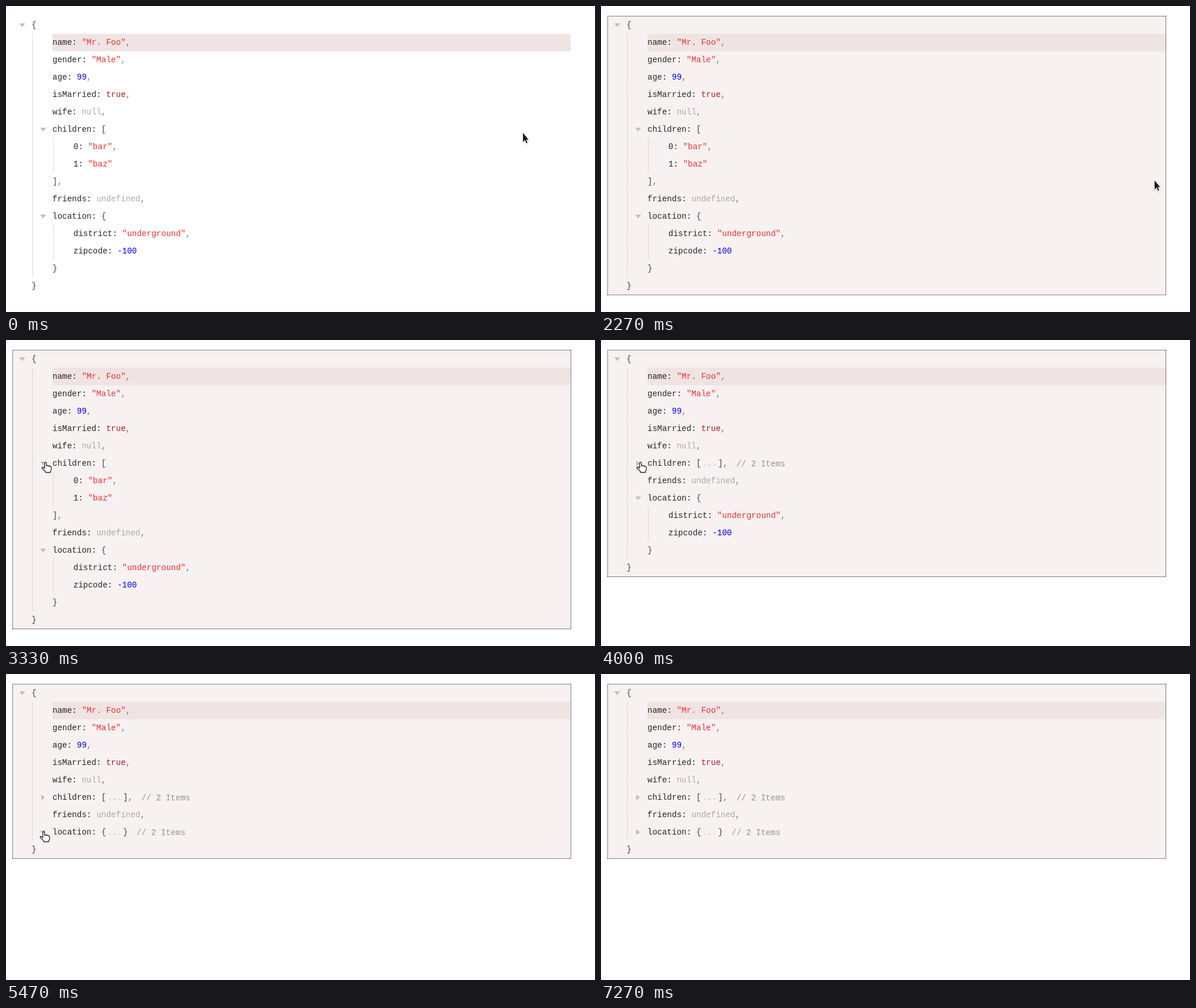
Recreate the animation shown at these times as an HTML page. Size 1014 by 528 pixels, loop 8000 ms.

```html
<!DOCTYPE html>
<html lang="en">
<head>
<meta charset="utf-8">
<title>JSON tree</title>
<style>
  html, body { margin: 0; width: 100%; height: 100%; overflow: hidden; background: #fff; }
  svg { display: block; }
  text {
    font: 14px "Liberation Mono", monospace;
    white-space: pre;
    fill: #262626;
  }
  .precise text { text-rendering: geometricPrecision; }
  .str { fill: #ee3030; }
  .num { fill: #0000ee; }
  .bool { fill: #a52020; }
  .nil { fill: #aaa; }
  .sep { fill: #777; }
  .brace { fill: #444; }
  .dots { fill: #c4c4c4; }
  .note { fill: #949490; }
  .arrow { fill: #bfbfbf; }
  .guide { stroke: #bbb; stroke-dasharray: 1 1; }
</style>
</head>
<body>
<svg id="stage" width="1014" height="528" viewBox="0 0 1014 528">
  <g id="tree"></g>
  <g id="pointer">
    <path id="tip" d="M0 0V15.4L3.5 12.2L5.9 17.8L7.9 16.9L5.6 11.4H9.6Z"
      fill="#1a1a1a" stroke="#fff" stroke-width="2" paint-order="stroke" stroke-linejoin="round"
      style="filter: drop-shadow(.5px 1px 1px rgba(0,0,0,.2))"/>
    <path id="hand" transform="translate(-7 -1)" fill="#fff" stroke="#222" stroke-width="1.3" stroke-linejoin="round"
      d="M5.5 11.5V2.5Q5.5 1 7 1T8.5 2.5V7.5Q8.7 6.4 10 6.4T11.6 7.6Q12 6.9 13.2 7T14.6 8.4Q15.2 8 16 8.3T17 10V13Q17 15 15.5 16.5V18.5H7V17L1.2 11.5Q.3 10 1.6 9.3Q2.6 9 3.6 10Z"/>
  </g>
</svg>
<script>
const LOOP = 8000, TICK = 1000 / 15, ROW = 30, TOP = 18, CHAR = 8.4;
const SELECT = 7, FOLD_LIST = 56, FOLD_MAP = 82, TURN = 4;
const $ = id => document.getElementById(id);

// Pointer path: tick, x, y; the pointer is hidden between the groups.
const paths = [
  [[0, 890, 219], [5, 722, 187], [10, 722, 187], [11, 741, 197]],
  [[34, 953, 301], [35, 874, 296], [37, 874, 296], [41, 640, 317], [45, 270, 282],
   [48, 92, 228], [50, 68, 211], [62, 68, 211], [63, 74, 219], [66, 87, 246],
   [69, 70, 275], [70, 71, 274], [72, 71, 274], [76, 65, 272], [86, 65, 272],
   [92, 497, 157], [95, 497, 157], [99, 660, 159], [107, 660, 159], [108, 743, 203]]
];
const handSpans = [[49, 62], [75, 86]];

const span = (cls, s) => `<tspan class="${cls}">${s}</tspan>`;
const comma = span('sep', ',');
const line = (x, row, body, dy = 0) =>
  `<text x="${x}" y="${TOP + row * ROW + 19 + dy}">${body}</text>`;
const guide = (x, from, to) =>
  `<path class="guide" d="M${x + .5} ${TOP + from * ROW}V${TOP + to * ROW}"/>`;

function arrow(x, row, turn) {
  const y = TOP + row * ROW + 15;
  return `<path class="arrow" d="M-5 -3H5L0 3.5Z" transform="translate(${x - turn * .3} ${y}) rotate(${-90 * turn})"/>`;
}

// One foldable child; returns its markup and the next free row.
function branch(row, key, open, close, items, tail, turn) {
  let out = arrow(64, row, turn) + line(80, row, `${key}: ${span('brace', open)}`);
  if (turn > 0) {
    const x = 80 + (key.length + 3) * CHAR;
    out += line(x + 2, row, span('dots', '...'))
      + line(x + 29.2, row, span('brace', close) + tail)
      + line(x + 52.4 + (tail ? CHAR : 0), row, span('note', '// 2 Items'), 1);
    return [out, row + 1];
  }
  const end = row + 1 + items.length;
  out += guide(81, row + 1, end);
  items.forEach((item, i) => out += line(116, row + 1 + i, item));
  return [out + line(80, end, span('brace', close) + tail), end + 1];
}

const turnAt = (k, start) => Math.max(0, Math.min(1, (k - start + .5) / (TURN + .5)));

function tree(k) {
  const plain = [
    'name: ' + span('str', '"Mr. Foo"'),
    'gender: ' + span('str', '"Male"'),
    'age: ' + span('num', '99'),
    'isMarried: ' + span('bool', 'true'),
    'wife: ' + span('nil', 'null')
  ];
  let out = arrow(28, 0, 0) + line(44, 0, span('brace', '{')), row = 1, part;
  for (const s of plain) out += line(80, row++, s + comma);

  [part, row] = branch(row, 'children', '[', ']',
    ['0: ' + span('str', '"bar"') + comma, '1: ' + span('str', '"baz"')],
    comma, turnAt(k, FOLD_LIST));
  out += part + line(80, row++, 'friends: ' + span('nil', 'undefined') + comma);

  [part, row] = branch(row, 'location', '{', '}',
    ['district: ' + span('str', '"underground"') + comma, 'zipcode: ' + span('num', '-100')],
    '', turnAt(k, FOLD_MAP));
  out += part + guide(45, 1, row) + line(44, row, span('brace', '}'));

  const h = (row + 1) * ROW;
  let back = '';
  if (k >= SELECT) {
    back = `<rect x="12" y="18" width="960" height="${h}" fill="#f7f1f1" opacity="${k > SELECT ? 1 : .5}"/>`;
    out += `<path d="M11 17.5H973M11 ${h + 18.5}H973M11.5 17V${h + 19}M972.5 17V${h + 19}" stroke="#000" stroke-dasharray="1 1"/>`;
  }
  return back + '<rect x="80" y="48" width="892" height="30" fill="#efe3e3"/>' + out;
}

function pointerAt(k) {
  const path = paths.find(p => k >= p[0][0] && k <= p[p.length - 1][0]);
  if (!path) return null;
  const i = Math.max(1, path.findIndex(p => p[0] >= k));
  const [a, ax, ay] = path[i - 1], [b, bx, by] = path[i];
  const u = (k - a) / (b - a);
  return [ax + (bx - ax) * u, ay + (by - ay) * u].map(Math.round);
}

let shown = -1;
function draw(ms) {
  const k = Math.floor((ms % LOOP + 3.5) / TICK) % 120;
  if (k === shown) return;
  shown = k;
  $('tree').innerHTML = tree(k);
  const pos = pointerAt(k), hand = handSpans.some(([a, b]) => k >= a && k <= b);
  $('pointer').style.display = pos ? '' : 'none';
  if (pos) $('pointer').setAttribute('transform', `translate(${pos})`);
  $('hand').style.display = hand ? '' : 'none';
  $('tip').style.display = hand ? 'none' : '';
}

// Hinted fonts may round the character pitch; ask for exact metrics then.
function checkPitch() {
  $('tree').innerHTML = line(0, 0, '0'.repeat(10));
  const width = $('tree').firstChild.getComputedTextLength();
  $('stage').classList.toggle('precise', Math.abs(width - 10 * CHAR) > 1);
}

checkPitch();
const start = performance.now();
function loop() {
  draw(performance.now() - start);
  requestAnimationFrame(loop);
}
loop();
</script>
</body>
</html>
```
